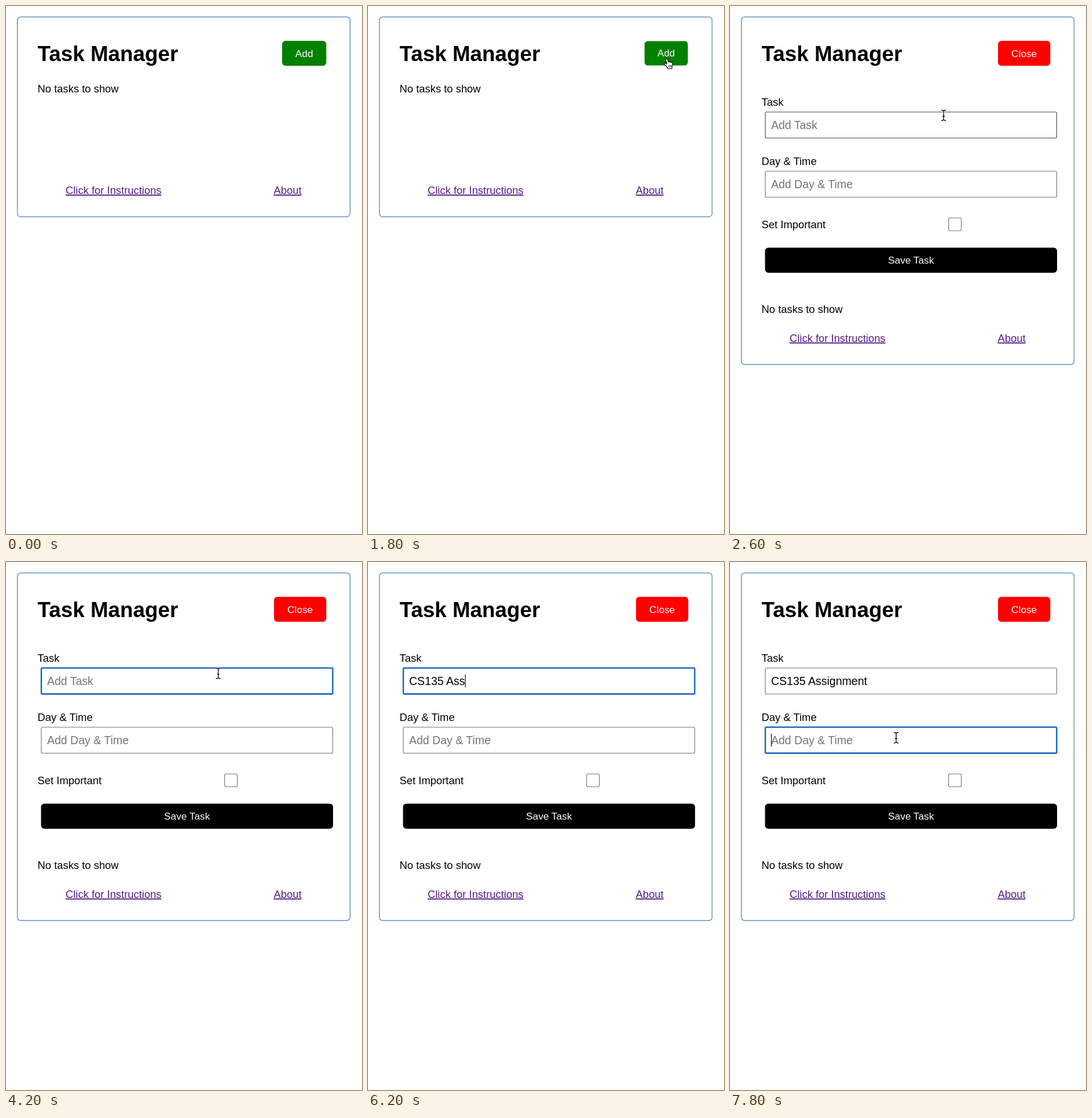
These frames come from a looping animation (615 by 910 pixels, 8000 ms). An HTML page:

```html
<!DOCTYPE html>
<html lang="en">
<head>
<meta charset="utf-8">
<title>Task Manager</title>
<style>
  html, body { margin: 0; width: 100%; height: 100%; overflow: hidden; background: #fff; }
  svg { display: block; font: 18.4px "Liberation Sans", Arial, Helvetica, sans-serif; }
  text { white-space: pre; }
  .title { font-size: 36.8px; font-weight: bold; }
  .button { font-size: 17.25px; fill: #fff; text-anchor: middle; }
  .link { fill: #551a8b; text-decoration: underline; }
  .value { font-size: 19.55px; }
  .card { fill: none; stroke: #4682b4; stroke-width: 1.2; }
  .box { fill: #fff; stroke: #767676; stroke-width: 1.15; }
  .box.hover { stroke: #4a4a4a; }
  .box.focus { stroke: #0a5cc0; stroke-width: 2.3; }
  .halo { fill: none; stroke: #fff; stroke-width: 3; }
  .beam { fill: none; stroke: #000; stroke-width: 1.3; }
</style>
</head>
<body>
<svg width="615" height="910" viewBox="0 0 615 910">
  <defs><path id="beamShape" d="M-4 -9Q-.5 -9 0 -7.2Q.5 -9 4 -9M0 -7.2V7.2M-4 9Q-.5 9 0 7.2Q.5 9 4 9M-2 1.5H2"/></defs>
  <rect id="card" class="card" x="19.6" y="18.9" width="574.8" rx="5.5"/>
  <text class="title" x="54.6" y="94.5">Task Manager</text>
  <g id="toggle">
    <rect id="toggleBox" y="60" height="43" rx="5.75"/>
    <text id="toggleText" class="button" y="87.5"></text>
  </g>
  <g id="form">
    <text x="54.6" y="172">Task</text>
    <rect id="taskBox" class="box" x="61" y="182.7" width="503.4" height="44.8" rx="2"/>
    <text id="taskText" class="value" x="70.9" y="212"></text>
    <text x="54.6" y="274">Day &amp; Time</text>
    <rect id="dayBox" class="box" x="61" y="284.7" width="503.4" height="44.8" rx="2"/>
    <text class="value" x="70.9" y="314" fill="#757575">Add Day &amp; Time</text>
    <text x="54.6" y="383">Set Important</text>
    <rect class="box" x="377.6" y="365.2" width="22" height="22" rx="2.8"/>
    <rect x="60.5" y="416.5" width="504.5" height="43.2" rx="5.75"/>
    <text class="button" x="312.7" y="444">Save Task</text>
    <rect id="caret" width="1.15" height="22"/>
  </g>
  <text id="empty" x="54.6">No tasks to show</text>
  <g id="links">
    <text class="link" x="103" y="324">Click for Instructions</text>
    <text class="link" x="462.5" y="324">About</text>
  </g>
  <g id="cursor">
    <path id="arrow" d="M0 0V15.5L3.6 12.2L6 17.6L8.5 16.5L6.2 11.3H11Z" stroke="#fff" stroke-width="1.2"/>
    <g id="hand" fill="#fff" stroke="#000" stroke-width="1.2" stroke-linejoin="round">
      <path d="M-.8 1.2C-.4 -.3 1.8 -.4 2.4 1.2L4 6C4.6 5 6 5.2 6.4 6.2C7.2 5.4 8.4 5.8 8.8 6.8C9.8 6.3 10.7 7 11 8.2C11.6 11 11 13 10 15V17.5H3.5C2.5 15 -1 12.5 -3.2 9.8C-4 8.6 -2.6 7.2 -1 8.2L1 9.6Z"/>
      <path d="M4.6 11.5V15M6.6 11.3V15M8.6 11V15" stroke-width=".9"/>
    </g>
    <g id="beam"><use href="#beamShape" class="halo"/><use href="#beamShape" class="beam"/></g>
  </g>
</svg>
<script>
const LOOP = 8000, STEP = 100;
const OPEN = 1900, PRESS = 1800, TASK_FOCUS = 2700, DAY_FOCUS = 7700;
const entry = "CS135 Assignment";
const keyTimes = [4300, 4500, 4800, 5100, 5300, 5600, 5900, 6100,
  6200, 6300, 6400, 6500, 6700, 6700, 6900, 7000];

// time, cursor shape, x, y
const cursorSteps = [
  [0, "none", 0, 0],
  [1300, "arrow", 546, 196], [1400, "arrow", 538, 165], [1500, "arrow", 528, 130],
  [1600, "hand", 520, 101], [1700, "hand", 516, 92], [1800, "hand", 515, 90.5],
  [2300, "hand", 506, 97], [2400, "arrow", 457, 132], [2500, "arrow", 394, 174],
  [2600, "beam", 369, 188.5], [2700, "beam", 367, 191], [2800, "beam", 366.7, 192],
  [4300, "none", 0, 0],
  [7300, "beam", 365, 195], [7400, "beam", 354, 211], [7500, "arrow", 328, 246],
  [7600, "beam", 300, 287], [7700, "beam", 289, 301], [7800, "beam", 287, 303]
];

const ui = {};
document.querySelectorAll("svg [id]").forEach(el => ui[el.id] = el);
const set = (el, attrs) => Object.entries(attrs).forEach(([k, v]) => el.setAttribute(k, v));
const show = (el, on) => { el.style.display = on ? "" : "none"; };
const inside = (x, y, top) => x > 60 && x < 565 && y > top && y < top + 46;

function drawCursor(t) {
  const [, shape, x, y] = cursorSteps.findLast(step => step[0] <= t);
  for (const name of ["arrow", "hand", "beam"]) show(ui[name], name === shape);
  set(ui.cursor, { transform: `translate(${x} ${y})` });
  return [x, y];
}

function drawLayout(t) {
  const open = t >= OPEN;
  const left = open ? 463 : 477;
  show(ui.form, open);
  set(ui.card, { height: open ? 599 : 344.4 });
  set(ui.empty, { y: open ? 528.5 : 149 });
  set(ui.links, { transform: `translate(0 ${open ? 254.8 : 0})` });
  set(ui.toggleBox, { x: left, width: 553.3 - left, fill: open ? "red" : "green" });
  set(ui.toggleText, { x: (left + 553.3) / 2 });
  ui.toggleText.textContent = open ? "Close" : "Add";
  const pressed = t >= PRESS && !open;
  set(ui.toggle, { transform: pressed ? "translate(515 81.5) scale(.98) translate(-515 -81.5)" : "" });
}

function drawFields(t, [x, y]) {
  const typed = keyTimes.filter(k => k <= t).length;
  const onDay = t >= DAY_FOCUS;
  const onTask = t >= TASK_FOCUS && !onDay;
  const state = (focus, top) => "box" + (focus ? " focus" : inside(x, y, top) ? " hover" : "");
  set(ui.taskBox, { class: state(onTask, 182) });
  set(ui.dayBox, { class: state(onDay, 284) });
  ui.taskText.textContent = typed ? entry.slice(0, typed) : "Add Task";
  set(ui.taskText, { fill: typed ? "#000" : "#757575" });

  const since = onDay ? DAY_FOCUS : typed ? keyTimes[typed - 1] : TASK_FOCUS;
  show(ui.caret, (onTask || onDay) && (t - since) % 1000 < 500);
  const advance = onTask && typed ? ui.taskText.getComputedTextLength() : 0;
  set(ui.caret, { x: 70.9 + advance, y: onDay ? 296 : 194 });
}

function draw(now) {
  const t = Math.floor((now % LOOP) / STEP) * STEP;
  drawLayout(t);
  drawFields(t, drawCursor(t));
}

const start = performance.now();
function tick() {
  draw(performance.now() - start);
  requestAnimationFrame(tick);
}
tick();
</script>
</body>
</html>
```
